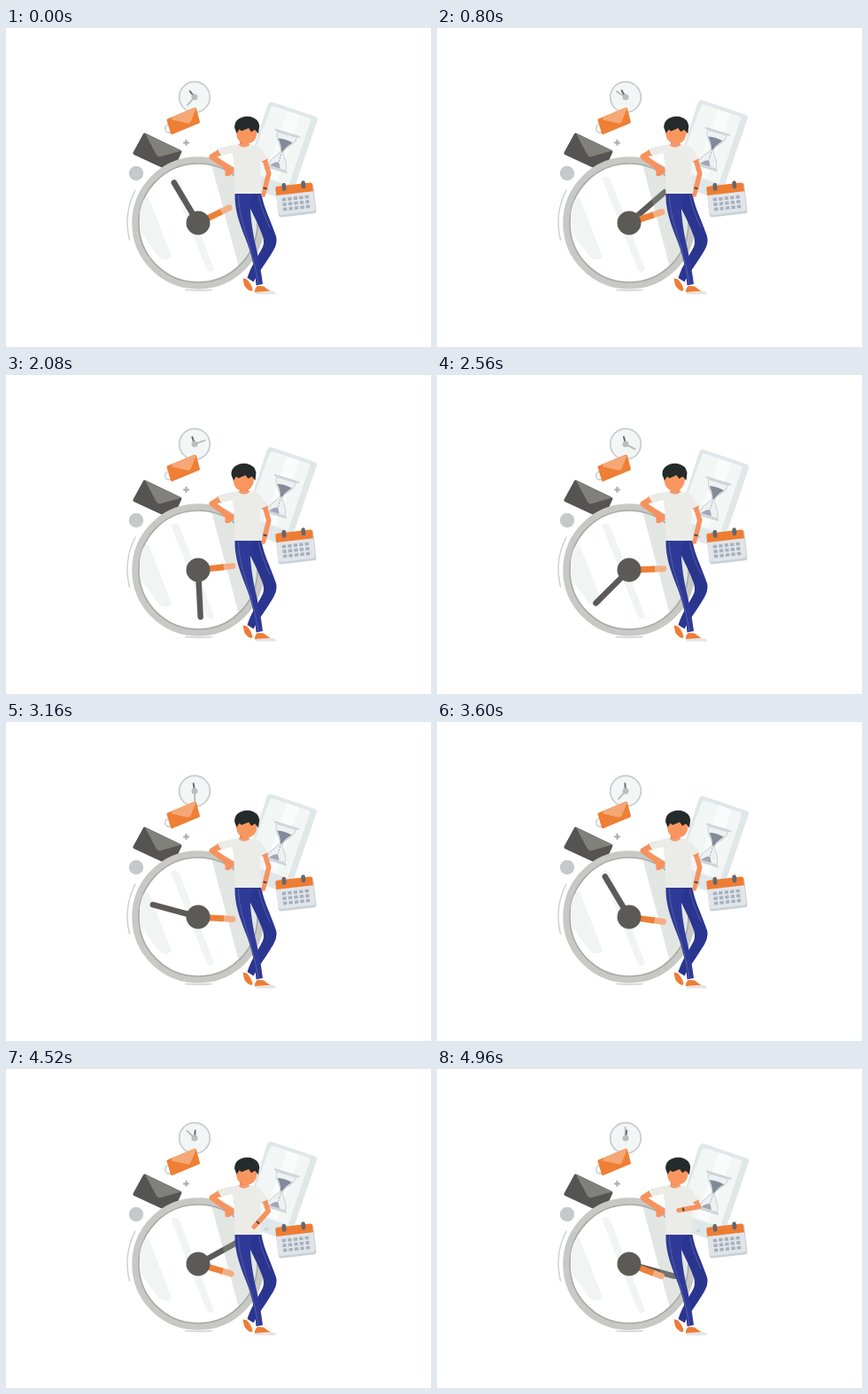
These frames come from a looping animation (480x360 px, 5 s). An HTML page:

```html
<!DOCTYPE html>
<html lang="en">
<head>
<meta charset="utf-8">
<title>Waiting by the clock</title>
<style>
  html, body { margin: 0; width: 100%; height: 100%; overflow: hidden; background: #fff; }
  svg { display: block; width: 100vw; height: 100vh; }
  .round { fill: none; stroke-linecap: round; stroke-linejoin: round; }
</style>
</head>
<body>
<svg viewBox="0 0 480 360">
  <defs>
    <clipPath id="face"><circle cx="217" cy="220" r="67"/></clipPath>
  </defs>

  <!-- small clock -->
  <circle cx="213" cy="78" r="17.3" fill="#f2f6f5" stroke="#c7ccd0" stroke-width="1.7"/>
  <g transform="translate(213 78)" class="round">
    <path id="smallMinute" d="M0 0V-12" stroke="#b4babd" stroke-width="1.8"/>
    <path id="smallHour" d="M0 0V-8.5" stroke="#6d6e6d" stroke-width="2"/>
    <circle r="3.5" fill="#b9bec0"/>
  </g>

  <!-- orange envelope -->
  <circle cx="184.500" cy="113.500" r="4.700" fill="none" stroke="#ccd1d3" stroke-width="1.700"/>
  <path d="M181.500 104Q181 103 182.500 102.500L212.500 90Q214.500 89.500 215 91L219 106Q219 107 218 107.500L188 120Q186.500 120.500 186 119Z" fill="#ee7f35"/>
  <path d="M188 100.500L213 90L214.500 91L208.500 106Q207.500 108 205 107.500L187 103.500Z" fill="#f5a876"/>

  <!-- dark envelope -->
  <path d="M155 119.500Q156 118 158 119L197.500 138Q199 139 198 141L190 158.500H178L144.500 143Q143 142 143.500 140.500Z" fill="#555452"/>
  <path d="M157 119L198 138.500L175 145Q171.500 146 169.500 142.500Z" fill="#80817b"/>

  <path d="M203.500 126V132.800M200.100 129.400H206.900" stroke="#a9abac" stroke-width="2"/>
  <circle cx="147" cy="164" r="8.200" fill="#c5c9c9"/>

  <!-- hourglass screen -->
  <g id="screen">
    <path d="M300.500 82.500L349.500 99Q352.500 100.500 351.500 103L320 195L266 176L295.500 85Q297.500 81.500 300.500 82.500Z" fill="#e0e7e9"/>
    <path d="M302.500 87.500L341.500 100.500Q344.500 102 343.500 104.500L319 177L272 161L298.500 89.500Q299.500 87 302.500 87.500Z" fill="#f2f7f6"/>
    <path d="M318 93L332 97.500L306 171L292 166Z" fill="#fafcfb"/>
    <ellipse cx="294.500" cy="181" rx="2.500" ry="1.800" fill="#cfd5d8"/>
    <g transform="translate(311.500 138) rotate(17)">
      <path d="M-11.500-19.500C-11.500-9-2-6-1.500 0C-2 6-10.500 9-10.500 20H10.500C10.500 9 2 6 1.500 0C2-6 11.500-9 11.500-19.500Z"
            fill="#edf1f2" stroke="#cbd1d6" stroke-width="1"/>
      <path d="M-8.500-12.500Q0-14.500 8.500-12.500Q2-5 1 0H-1Q-2-5-8.500-12.500Z" fill="#858a99"/>
      <path d="M0 0V12" stroke="#a5aab5" stroke-width="1" stroke-dasharray="2 1.500"/>
      <path d="M-8.500 19.500Q-5 14 0 13Q2 16 3.500 19.500Z" fill="#a2a6b5"/>
      <path d="M-14-21H14M-12 21.500H12" stroke="#cdd2d6" stroke-width="2" class="round"/>
    </g>
  </g>

  <!-- calendar -->
  <g transform="translate(326.700 192) rotate(-6.500)">
    <rect x="-21" y="-15" width="43" height="34.500" rx="3" fill="#c9d0d6"/>
    <rect x="-21" y="-15" width="42" height="32" rx="3" fill="#e0e5ea"/>
    <path d="M-21-5.500V-13Q-21-15.500-18.500-15.500H18.500Q21-15.500 21-13V-5.500Z" fill="#ee7d33"/>
    <g id="days" fill="#a9afbb"></g>
    <rect x="-13.500" y="-18.500" width="4.600" height="9" rx="2.300" fill="#62666f"/>
    <rect x="8.500" y="-18.500" width="4.600" height="9" rx="2.300" fill="#62666f"/>
  </g>

  <!-- big clock -->
  <g class="round" stroke="#ced2d1" stroke-width="1.500">
    <path d="M146 183A80 80 0 0 0 139.500 239"/>
    <path d="M203 295.500Q217 297 232 295.500"/>
  </g>
  <circle cx="217" cy="220" r="71" fill="#fff" stroke="#c8c9c5" stroke-width="7.500"/>
  <circle cx="217" cy="220" r="67" fill="none" stroke="#a8aaa7" stroke-width="1.600"/>
  <g clip-path="url(#face)">
    <g fill="#f0f5f3">
      <path d="M151 208Q153 192 161 191L187 258Q181 265 172 258L152 230Z"/>
      <path d="M186 169Q192 165 196 171L235 272Q231 279 226 271Z"/>
    </g>
    <g transform="translate(217 220)">
      <path id="minute" d="M0 0V-53" class="round" stroke="#5b5a57" stroke-width="6.500"/>
    </g>
    <path d="M231 150L263 270L300 270V145Z" fill="#a0aca4" opacity=".3"/>
    <g transform="translate(217 220)">
      <g id="hour" stroke-width="7">
        <path d="M0-28V-39" class="round" stroke="#f4ae84"/>
        <path d="M0-10V-29" stroke="#ee8035"/>
      </g>
      <circle r="13.500" fill="#5b5a57"/>
    </g>
  </g>

  <!-- legs and shoes -->
  <path d="M267.500 282.500L272 283.500Q278 290 278.500 296L276.500 297Q271 294.500 269 290Z" fill="#ef7c36"/>
  <path d="M281 298Q281 292.500 284.500 291L291 291.500Q295 295 299 297L298 299H282Z" fill="#ef7c36"/>
  <path d="M281 298L298 296.800Q304 297 305 299.500V300.500H282Z" fill="#e6e4df"/>
  <path d="M270 187H288.500C291 203 299 217 305 235Q307 243 302 251C295 263 287 273 279.500 286.500L272.500 282C277 268 285 257 290 247Q292 242 290 235C286 224 281 214 276.500 205Z" fill="#2a3590"/>
  <path d="M258.500 187H280Q276 196 276 206C277 220 279 231 281 241C285 258 288 273 290 289L282.500 290.500C281 270 277 254 271 239C263 219 258 204 258.500 187Z" fill="#2f3a98"/>
  <g class="round" stroke="#5e699f" stroke-width=".8">
    <path d="M262.500 189C263 212 271 230 276 249Q282 270 285 289"/>
    <path d="M285.500 189Q288 204 298 225"/>
  </g>

  <!-- resting arm -->
  <path d="M244 138.500L232.800 145.300L251 158" class="round" stroke="#f7925e" stroke-width="6.500"/>
  <path d="M248 154.500L257.500 157.500V163Q254 164 253 166.500Q250 168 247.500 166.500Q248 162 246.500 158Z" fill="#f7925e"/>

  <!-- torso -->
  <path d="M264 127H274V135H264Z" fill="#ec8350"/>
  <path d="M262 131.500Q268 137 276 131.500Q284 132 288 136L296 148L289 151.500L287 150L288.500 187H258.500L257.500 154L255.500 141L242 144.500L238 137.500Q250 132 262 131.500Z" fill="#ebece8"/>
  <path d="M262 131.500Q268 137.500 276 131.500L273 130.500H265Z" fill="#f09c70"/>
  <path d="M238.500 137.500L242.500 144.500" stroke="#ee8a50" stroke-width="1.300"/>

  <!-- head -->
  <g id="head">
    <path d="M256.500 113V119Q257.500 130 268 131Q279 130 280 118V110Z" fill="#f99660"/>
    <path d="M254.500 113Q254 107 258 103.500Q264 98.500 272 100Q281 102 282.500 110L281.500 119L277.500 114.500L273.500 117L270.500 113L262.500 116.500L260 114.500L257 119Z" fill="#252a2b"/>
  </g>

  <!-- watch arm -->
  <path id="arm" class="round" stroke="#f7925e" stroke-width="5.500"/>
  <path id="hand" class="round" stroke="#f7925e" stroke-width="5"/>
  <path id="watch" stroke="#3d3f46" stroke-width="1.800"/>
  <path d="M286 137L296.500 147.500L289 151L285 149Z" fill="#ebece8"/>
  <path d="M296 148L289 151.200" stroke="#ee8a50" stroke-width="1.200"/>
</svg>
<script>
const LOOP = 5000;
const $ = id => document.getElementById(id);
const mix = (a, b, k) => a + (b - a) * k;
const turn = (id, deg) => $(id).setAttribute("transform", `rotate(${deg})`);
const line = (id, ...pts) => $(id).setAttribute("d", "M" + pts.map(p => p.join(" ")).join("L"));

function ease(t, from, to) {
  const k = Math.min(1, Math.max(0, (t - from) / (to - from)));
  return k * k * (3 - 2 * k);
}

for (let row = 0; row < 3; row++) {
  for (let col = 0; col < 5; col++) {
    const day = document.createElementNS("http://www.w3.org/2000/svg", "rect");
    const box = { x: -15 + col * 6.5, y: -1.7 + row * 5.5, width: 4.3, height: 3.6, rx: 0.6 };
    for (const key in box) day.setAttribute(key, box[key]);
    $("days").append(day);
  }
}

function poseArm(lift) {
  const elbow = [mix(296.8, 295.5, lift), mix(164, 155.5, lift)];
  const angle = mix(104, 170, lift) * Math.PI / 180;
  const along = d => [elbow[0] + d * Math.cos(angle), elbow[1] + d * Math.sin(angle)];
  const side = (p, d) => [p[0] - d * Math.sin(angle), p[1] + d * Math.cos(angle)];
  const wrist = along(17.5);
  line("arm", [292, 148], elbow, wrist);
  line("hand", wrist, along(mix(25, 23, lift)));
  line("watch", side(wrist, -2), side(wrist, 2));
}

function draw(t) {
  turn("minute", 329 + t * 0.1);
  turn("hour", 64 + t * 0.0094);
  turn("smallMinute", 222 + t * 0.1);
  turn("smallHour", -38 + t * 0.0094);

  const bob = Math.cos((t - 210) / 1180 * 2 * Math.PI);
  $("screen").setAttribute("transform", `translate(${bob * 0.7} ${0.3 + bob * 1.4})`);

  const look = 1 - ease(t, 200, 1400) + ease(t, 2600, 3120);
  $("head").setAttribute("transform", `translate(${look * 3.2} 0) rotate(${look * 1.5} 268 130)`);
  poseArm(ease(t, 4250, 4850));
}

function tick() {
  draw(performance.now() % LOOP);
  requestAnimationFrame(tick);
}
tick();
</script>
</body>
</html>
```
